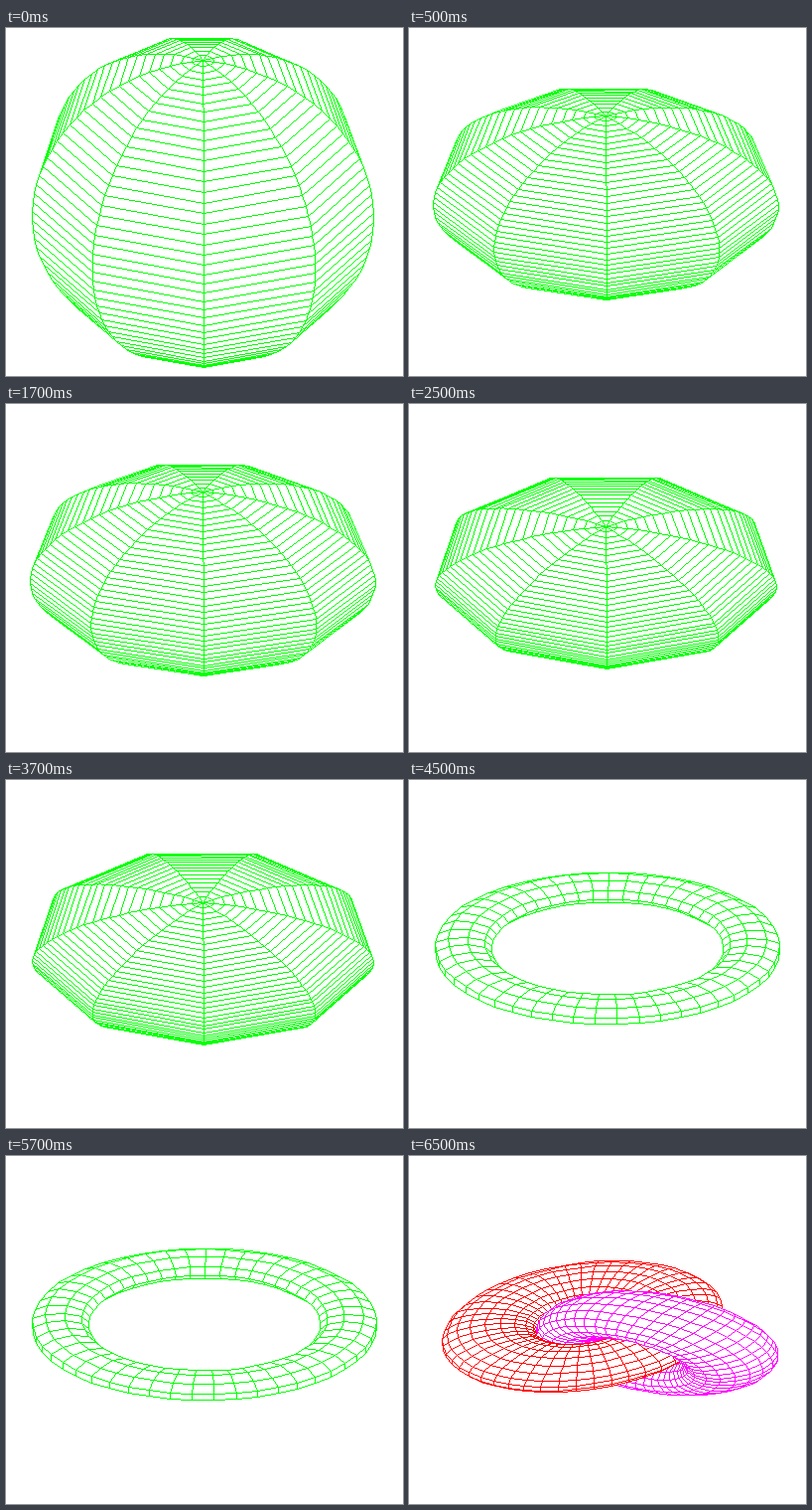
Recreate the animation shown at these times as an HTML page with a canvas. Size 400 by 350 pixels, loop 8000 ms.

```html
<!DOCTYPE html>
<html>
<head>
<meta charset="utf-8">
<style>
html, body { margin: 0; width: 100%; height: 100%; overflow: hidden; background: #fff; }
canvas { display: block; }
</style>
</head>
<body>
<canvas width="400" height="350"></canvas>
<script>
const W = 400, H = 350, { PI, sin, cos, abs, min, max, round, sqrt } = Math;
const GREEN = 0xff00ff00, RED = 0xff0000ff, MAGENTA = 0xffff00ff, WHITE = 0xffffffff;
const ctx = document.querySelector('canvas').getContext('2d');
const image = ctx.createImageData(W, H);
const pixels = new Uint32Array(image.data.buffer);

// Surfaces of two parameters
const ball = (u, v) => [cos(u) * cos(v), cos(u) * sin(v), sin(u)];
const hoop = (u, v) => [(1 - .2 * cos(v)) * cos(u), (1 - .2 * cos(v)) * sin(u), .2 * sin(v)];
const flat = (u, v) => [(1 + .5 * cos(v)) * cos(u), (1 + .5 * cos(v)) * sin(u), .5 * sin(v)];
const upright = (u, v) => { const [x, y, z] = flat(u, v); return [1 + x, z, y]; };

// u runs from u0 to u1 in nu steps, v makes a full turn from v0 in nv steps
const nu = 49;
const surface = (f, color, nv, u0, u1, v0) => ({ f, color, nv, u0, u1, v0 });
const sphere = surface(ball, GREEN, 9, -PI / 2, PI / 2, 0);
const torus = surface(hoop, GREEN, 9, 0, 2 * PI, 0);
const link = (f, color) => surface(f, color, 19, -PI, PI, -PI);

// ox, oy: centre; rx, ry: half extents of the ground plane on screen; rz: height;
// turn: rotation in degrees; sx, sy: axis lengths
const view = (start, ox, oy, rx, ry, rz, turn, sx, sy, ...surfaces) =>
  ({ start, ox, oy, rx, ry, rz, turn: turn * PI / 180, sx, sy, surfaces });
const scenes = [
  view(0, 198, 174.3, 171, 85.5, 142, 50, .97, .985, sphere),
  view(500, 197.6, 165.5, 172.8, 73.1, 77.4, 50, .97, .985, sphere),
  view(2500, 198, 167.6, 171, 85.5, 45, 50, .97, .985, sphere),
  view(4500, 199.6, 169, 146, 61.7, 45, 50, 1, 1, torus),
  view(6500, 174.5, 171, 173, 66.8, 23.5, 30, 2, 1.5, link(flat, RED), link(upright, MAGENTA))
];

function project(s, [x, y, z]) {
  x /= s.sx;
  y /= s.sy;
  const right = x * cos(s.turn) + y * sin(s.turn);
  const near = x * sin(s.turn) - y * cos(s.turn);
  const k = s.ry / s.rx, tilt = sqrt(1 - k * k);
  return {
    x: round(s.ox + s.rx * right),
    y: round(s.oy + s.ry * near - s.rz * z),
    depth: s.rx * near * tilt + s.rz * z * k / tilt
  };
}

function plot(x, y, color) {
  if (x >= 0 && x < W && y >= 0 && y < H) pixels[y * W + x] = color;
}

function line(p, q, color) {
  if (p.x > q.x || p.x === q.x && p.y > q.y) [p, q] = [q, p];
  const n = max(abs(q.x - p.x), abs(q.y - p.y));
  for (let i = 0; i <= n; i++) {
    const t = n ? i / n : 0;
    plot(round(p.x + (q.x - p.x) * t), round(p.y + (q.y - p.y) * t), color);
  }
}

const cross = (p, q, x, y) => (q.x - p.x) * (y - p.y) - (q.y - p.y) * (x - p.x);

function erase(a, b, c) {
  const area = cross(a, b, c.x, c.y);
  if (!area) return;
  for (let y = min(a.y, b.y, c.y); y <= max(a.y, b.y, c.y); y++)
    for (let x = min(a.x, b.x, c.x); x <= max(a.x, b.x, c.x); x++)
      if (cross(a, b, x, y) * area >= 0 && cross(b, c, x, y) * area >= 0 &&
          cross(c, a, x, y) * area >= 0) plot(x, y, WHITE);
}

function quads(s, { f, color, nv, u0, u1, v0 }) {
  const at = (i, j) => project(s, f(u0 + (u1 - u0) * i / nu, v0 + 2 * PI * j / nv));
  const list = [];
  for (let i = 0; i < nu; i++)
    for (let j = 0; j < nv; j++) {
      const p = [at(i, j), at(i + 1, j), at(i + 1, j + 1), at(i, j + 1)];
      list.push({ p, color, depth: p.reduce((sum, c) => sum + c.depth, 0) });
    }
  return list;
}

// Paint cells from far to near, each hiding what lies behind it
function draw(s) {
  pixels.fill(WHITE);
  const cells = s.surfaces.flatMap(one => quads(s, one)).sort((m, n) => m.depth - n.depth);
  for (const { p, color } of cells) {
    erase(p[0], p[1], p[2]);
    erase(p[0], p[2], p[3]);
    p.forEach((c, i) => line(c, p[(i + 1) % 4], color));
  }
  ctx.putImageData(image, 0, 0);
}

let shown;
function tick() {
  const t = performance.now() % 8000;
  const s = scenes.findLast(one => one.start <= t);
  if (s !== shown) draw(shown = s);
  requestAnimationFrame(tick);
}
tick();
</script>
</body>
</html>
```
